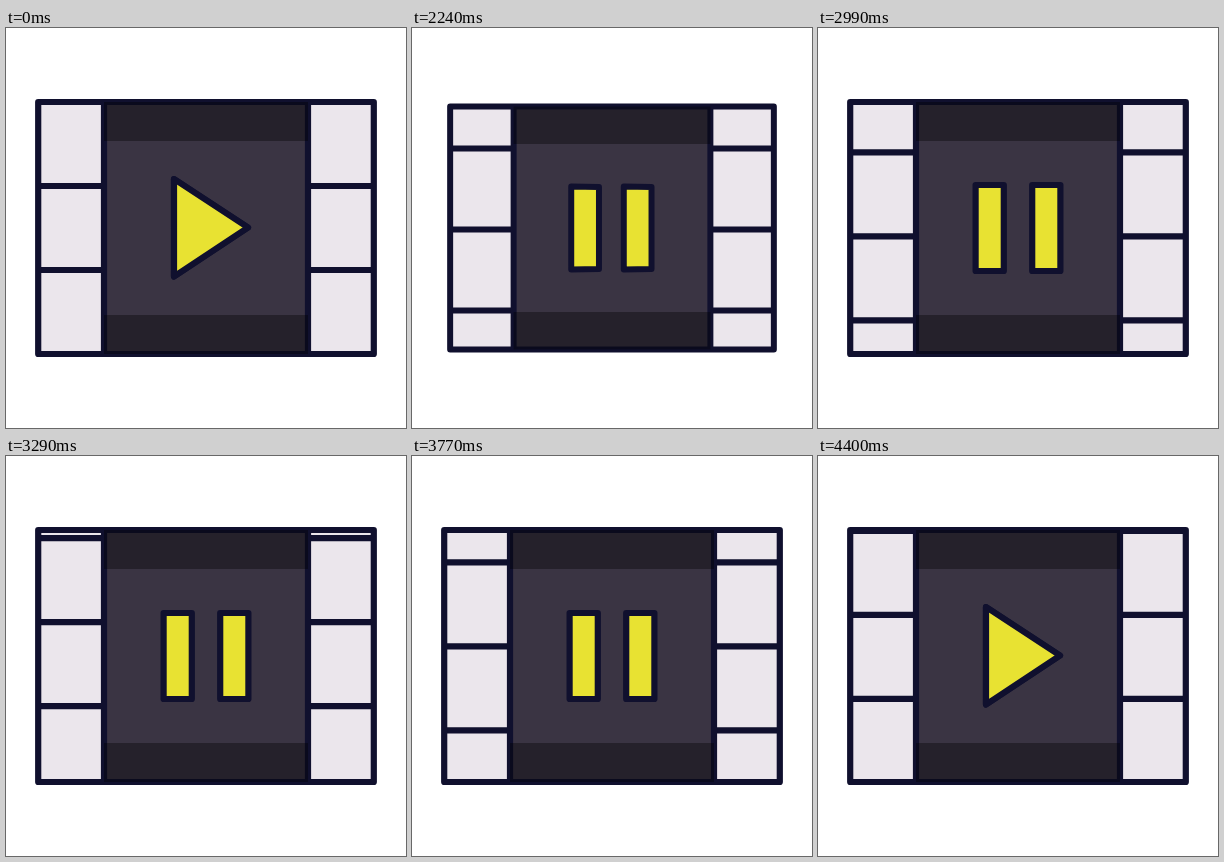
Recreate the animation shown at these times as an HTML page. Size 400 by 400 pixels, loop 4.43 s.

```html
<!DOCTYPE html>
<html lang="en">
<head>
<meta charset="utf-8">
<title>Film play and pause</title>
<style>
  html, body { margin: 0; width: 100%; height: 100%; overflow: hidden; background: #fff; }
  svg { display: block; width: 100%; height: 100%; }
  .ink { stroke: #10102e; stroke-width: 6.2; stroke-linejoin: round; stroke-linecap: round; }
  .gold { fill: #e8e232; }
</style>
</head>
<body>
<svg viewBox="0 0 400 400">
  <clipPath id="inside"><rect x="32.2" y="74" width="335.6" height="252"/></clipPath>
  <g id="film">
    <rect x="32.2" y="74" width="335.6" height="252" fill="#ebe6ec"/>
    <path id="bars" class="ink" clip-path="url(#inside)"/>
    <rect x="98" y="74" width="204" height="252" fill="#3a3443"/>
    <path class="ink" fill="none" d="M98 74V326M302 74V326M32.2 74H367.8V326H32.2Z"/>
    <path fill="#000" fill-opacity=".36" d="M98 74H302V113H98ZM98 287H302V326H98Z"/>
    <path id="right" class="ink gold"/>
    <path id="left" class="ink gold"/>
  </g>
</svg>
<script>
  const LOOP = 4430, STEP = 30, START = 2000;
  const STEPS = (LOOP - START) / STEP;
  const PITCH = 84, TRAVEL = 15 * PITCH;
  const SPIN_UP = { len: 13.6, pow: 1.2 }, SPIN_DOWN = { len: 31.8, pow: 0.75 };
  const BACK = 66, MORPH = 10, PULSE = 11.4;

  const PLAY = [[168, 151], [242, 199.5], [242, 199.5], [168, 248.5]];
  const PAUSE = [[157.6, 157], [185.8, 157], [185.8, 243], [157.6, 243]];
  const GAP = 56.6;

  const $ = id => document.getElementById(id);
  const film = $('film'), bars = $('bars'), left = $('left'), right = $('right');

  const lost = ({ len, pow }) => len * pow / (pow + 1);
  const speed = TRAVEL / (STEPS - lost(SPIN_UP) - lost(SPIN_DOWN));

  // Distance covered n steps away from rest, ramping up to full speed.
  function ramp(n, r) {
    if (n >= r.len) return speed * (n - lost(r));
    return speed * r.len / (r.pow + 1) * (n / r.len) ** (r.pow + 1);
  }

  function scrolled(s) {
    return s < STEPS / 2 ? ramp(s, SPIN_UP) : TRAVEL - ramp(STEPS - s, SPIN_DOWN);
  }

  const easeOut = n => 1 - (1 - Math.min(1, Math.max(0, n / MORPH))) ** 2.73;
  const dip = n => n > 0 && n < PULSE ? 0.044 * Math.sin(Math.PI * n / PULSE) : 0;

  function shape(q, dx) {
    const pts = PLAY.map(([x, y], i) =>
      [x + (PAUSE[i][0] - x) * q + dx, y + (PAUSE[i][1] - y) * q].map(v => v.toFixed(2)));
    return 'M' + pts.join('L') + 'Z';
  }

  function draw(t) {
    const s = Math.max(0, Math.floor((t - START) / STEP + 0.001));

    const size = 1 - dip(s) - dip(s - BACK);
    film.setAttribute('transform', `translate(200 200) scale(${size}) translate(-200 -200)`);

    const phase = (TRAVEL - scrolled(s)) % PITCH;
    let d = '';
    for (let y = 74 + phase; y < 330; y += PITCH) d += `M32 ${y.toFixed(2)}H368`;
    bars.setAttribute('d', d);

    const back = easeOut(s - BACK);
    const q = easeOut(s) - back;
    const slide = easeOut(s - 1) - back;
    left.setAttribute('d', shape(q, 0));
    right.setAttribute('d', shape(q, GAP * slide));
  }

  const begin = performance.now();
  function tick() {
    draw((performance.now() - begin) % LOOP);
    requestAnimationFrame(tick);
  }
  tick();
</script>
</body>
</html>
```
